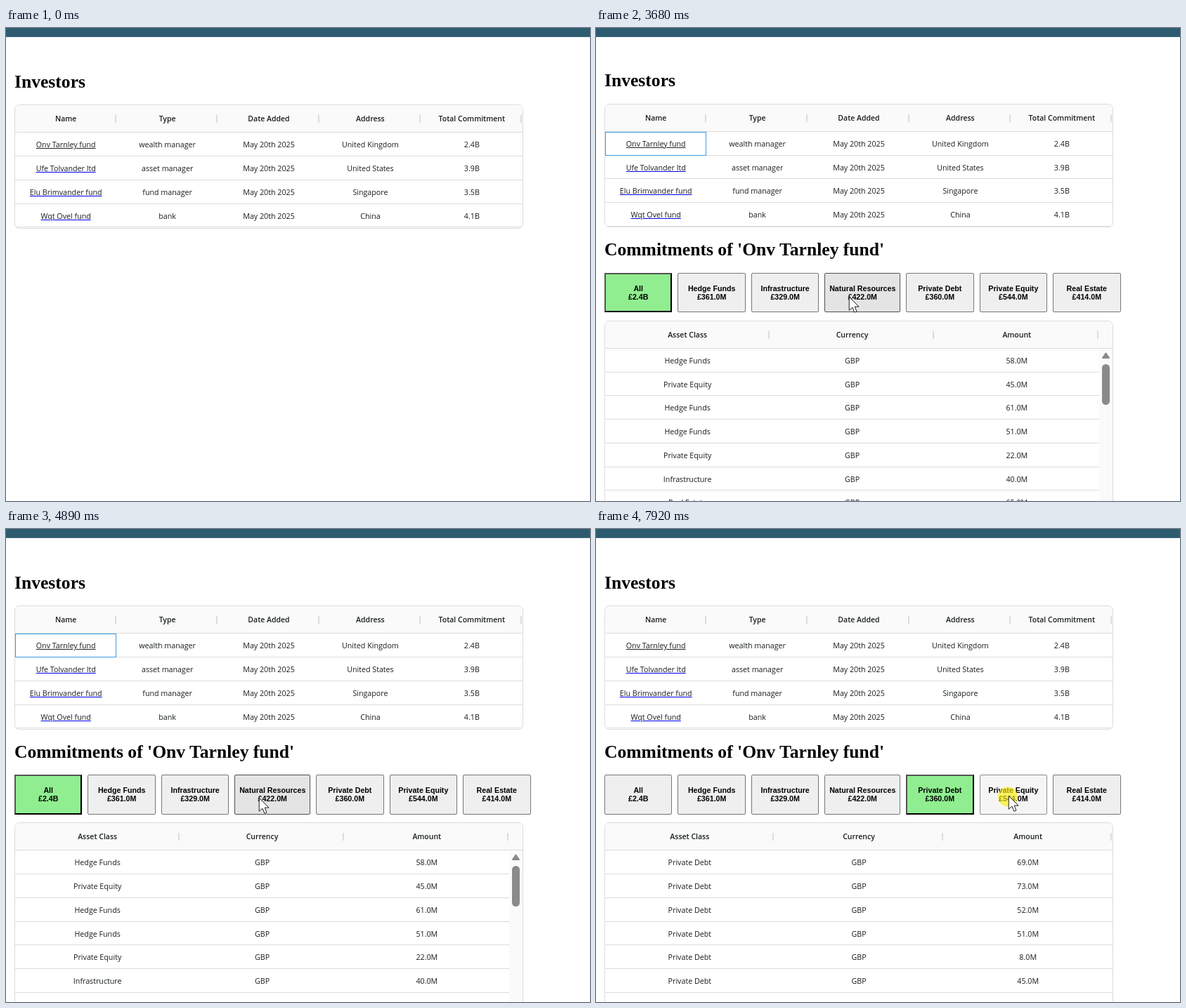
These frames come from a looping animation (831x674 px, 7.99 s). An HTML page:

```html
<!DOCTYPE html>
<html lang="en">
<head>
<meta charset="utf-8">
<title>Investors</title>
<style>
html, body { margin: 0; width: 100%; height: 100%; overflow: hidden; background: #fff; }
body { position: relative; font: 10.7px/34px "Open Sans", "Noto Sans", sans-serif; color: #181d1f; }
#bar { position: absolute; inset: 0 0 auto; height: 12px; background: #2d5b70; border-bottom: 1px solid #456f83; }
#page { position: absolute; left: 0; width: 100%; height: 100%; }
h1 { position: absolute; left: 12px; margin: 0; font: bold 25.6px/30px "Liberation Serif", serif; color: #000; white-space: nowrap; }
.grid { position: absolute; left: 12px; width: 722px; border: 1px solid #dcdcdc; border-radius: 7px; overflow: hidden; }
.row { display: flex; height: 33.75px; box-sizing: border-box; border-bottom: 1px solid #dcdcdc; }
.row > div { flex: 1 1 0; text-align: center; position: relative; white-space: nowrap; }
.head { height: 39.1px; background: #fafafa; font-weight: 600; font-size: 10.5px; line-height: 39px; }
.head i { position: absolute; right: .6px; top: 14px; width: 2px; height: 11px; background: #dcdcdc; }
.scrolls .head { padding-right: 19px; }
.scrolls .body { margin-right: 19px; }
.gutter { position: absolute; right: 0; top: 39.1px; bottom: 0; width: 19px; background: #fafafa; }
.gutter svg { position: absolute; left: 4px; top: 5px; }
.thumb { position: absolute; left: 4px; top: 22px; width: 11px; border-radius: 5.5px; background: #8a8a8a; }
.hover { background: #edf6fe; }
u { text-decoration-color: #00e; }
.row:first-child u { text-decoration-color: #222; }
#focus { position: absolute; left: 13px; top: 149.4px; width: 142px; height: 32px; border: 1px solid #3d9be3; }
#buttons { position: absolute; left: 12px; top: 350.4px; display: flex; gap: 8.1px; }
#buttons div { width: 96.4px; height: 56.6px; box-sizing: border-box; border: 1px solid #767676; border-radius: 2px;
  background: #efefef; color: #000; text-align: center; white-space: pre; padding-top: 15px;
  font: bold 10.67px/12px "Liberation Sans", Arial, sans-serif; }
#buttons div:nth-child(4) { width: 107.6px; }
#buttons .over { background: #e4e4e4; border-color: #4f4f4f; }
#buttons .down { background: #f5f5f5; border-color: #8d8d8d; }
#buttons .on { background: #90ee90; border: 2px outset #000; border-radius: 0; padding-top: 14px; }
#mouse { position: absolute; left: 0; top: 0; overflow: visible; }
</style>
</head>
<body>
<div id="page">
  <h1 style="top:61.5px">Investors</h1>
  <div class="grid" id="investors" style="top:109.4px;height:174.6px"></div>
  <div id="focus"></div>
  <div id="detail">
    <h1 style="top:302.5px">Commitments of 'Onv Tarnley fund'</h1>
    <div id="buttons"></div>
    <div class="grid" id="commitments" style="top:418.4px;height:380px"></div>
  </div>
</div>
<div id="bar"></div>
<svg id="mouse" width="1" height="1">
  <circle id="ring" cx="-1" cy="1.5" r="14" fill="#faee0a" fill-opacity=".65"/>
  <path id="arrow" transform="scale(1.1)" fill="#fff" stroke="#111" stroke-width=".85" d="M.2 .2V17.5L4.5 13.8L7.2 20.2L10 19L7.4 12.8H12.8Z"/>
  <path id="hand" fill="#fff" stroke="#111" stroke-width="1.1" stroke-linejoin="round"
    d="M-2 2Q0-1 2 2V10Q4 8.5 6 10Q8 9 9 11Q11 10.5 11.5 13V18Q11 21 9 25H0Q-2 21-5 17Q-6 13-2 15ZM2 10V14M6 10V14M9 11V15"/>
</svg>
<script>
const $ = id => document.getElementById(id);
const LOOP = 7990;

const row = (cells, cls = '') => `<div class="row ${cls}">${cells.map(c => `<div>${c}</div>`).join('')}</div>`;
const grid = (titles, rows) =>
  row(titles.map(t => t + '<i></i>'), 'head') + `<div class="body">${rows.map(r => row(r)).join('')}</div>`;

const investors = [
  ['Onv Tarnley fund', 'wealth manager', 'United Kingdom', '2.4B'],
  ['Ufe Tolvander ltd', 'asset manager', 'United States', '3.9B'],
  ['Elu Brimvander fund', 'fund manager', 'Singapore', '3.5B'],
  ['Wqt Ovel fund', 'bank', 'China', '4.1B']
];
$('investors').innerHTML = grid(['Name', 'Type', 'Date Added', 'Address', 'Total Commitment'],
  investors.map(([name, type, place, sum]) => [`<u>${name}</u>`, type, 'May 20th 2025', place, sum]));
const investorRows = [...$('investors').querySelectorAll('.body .row')];

const classes = ['All', 'Hedge Funds', 'Infrastructure', 'Natural Resources', 'Private Debt', 'Private Equity', 'Real Estate'];
const totals = ['2.4B', '361.0M', '329.0M', '422.0M', '360.0M', '544.0M', '414.0M'];
$('buttons').innerHTML = classes.map((c, i) => `<div>${c}\n£${totals[i]}</div>`).join('');
const buttons = [...$('buttons').children];

// Each deal is a class initial and an amount; the rest of the 50 follow a rule.
const deals = 'H58 E45 H61 H51 E22 I40 R65 N11 N69 H14 H18 H22 D69 D73 D52 D51 D8 D45'.split(' ');
while (deals.length < 50) deals.push('HINER'[deals.length % 5] + (10 + deals.length * 37 % 65));
const initials = ' HINDER';

let shown = -1;
function showCommitments(filter) {
  if (filter === shown) return;
  shown = filter;
  const rows = deals.filter(d => !filter || d[0] === initials[filter])
    .map(d => [classes[initials.indexOf(d[0])], 'GBP', d.slice(1) + '.0M']);
  const scrolls = rows.length > 10;
  const gutter = `<div class="gutter"><svg width="12" height="10"><path d="M5.5 1.5L10 8H1Z" fill="#8a8a8a" stroke="#8a8a8a" stroke-width="2" stroke-linejoin="round"/></svg>
    <div class="thumb" style="height:${2900 / rows.length}px"></div></div>`;
  $('commitments').classList.toggle('scrolls', scrolls);
  $('commitments').innerHTML = grid(['Asset Class', 'Currency', 'Amount'], rows) + (scrolls ? gutter : '');
}

// Mouse moves; those with a pick end in a click.
const moves = [
  { from: 1180, to: 1520, x: 73, y: 157 },
  { from: 1580, to: 1910, x: 75, y: 168, pick: 0 },
  { from: 2330, to: 2610, x: 360, y: 383 },
  { from: 5150, to: 5560, x: 170, y: 383, pick: 1 },
  { from: 5970, to: 6230, x: 276, y: 382, pick: 2 },
  { from: 6580, to: 6770, x: 370, y: 382, pick: 3 },
  { from: 7120, to: 7300, x: 464, y: 381, pick: 4 },
  { from: 7590, to: 7910, x: 587, y: 380, pick: 5 }
];
const clicks = moves.filter(m => 'pick' in m);
const PRESS = 10, SELECT = 80, LOAD = 150; // delays after arrival
const picked = (t, delay) => clicks.reduce((last, c) => t >= c.to + delay ? c.pick : last, 0);

const ramp = (a, b, t) => {
  const p = Math.min(1, Math.max(0, (t - a) / (b - a)));
  return p * p * (3 - 2 * p);
};
const scrollAt = t => t < 3680 ? 0 : (1.6 + 93.6 * ramp(3740, 3820, t)) * (1 - ramp(4600, 4890, t));
const show = (id, on) => $(id).style.visibility = on ? 'visible' : 'hidden';

function draw(t) {
  let x = 140, y = 245;
  for (const m of moves) {
    const p = ramp(m.from, m.to, t);
    x += (m.x - x) * p;
    y += (m.y - y) * p;
  }
  const inside = t >= 850;
  const overRow = inside && y >= 150 ? Math.floor((y - 150) / 33.75) : -1;
  const pressed = clicks.some(c => t >= c.to + PRESS && t < c.to + LOAD);
  const selected = picked(t, SELECT);

  $('page').style.top = -scrollAt(t) + 'px';
  investorRows.forEach((r, i) => r.classList.toggle('hover', i === overRow));
  show('focus', t >= 1920 && t < 5570);
  show('detail', t >= 2000);
  showCommitments(picked(t, LOAD));

  buttons.forEach((b, i) => {
    const left = b.offsetLeft + 12;
    const over = y > 350 && x >= left && x <= left + b.offsetWidth;
    b.className = i === selected ? 'on' : over ? (pressed ? 'down' : 'over') : '';
  });

  const hand = overRow >= 0 && overRow < 4 && x < 130;
  $('mouse').style.transform = `translate(${Math.round(x)}px, ${Math.round(y)}px)`;
  show('ring', pressed);
  show('hand', inside && hand);
  show('arrow', inside && !hand);
}

const start = performance.now();
(function tick() {
  draw((performance.now() - start) % LOOP);
  requestAnimationFrame(tick);
})();
</script>
</body>
</html>
```
